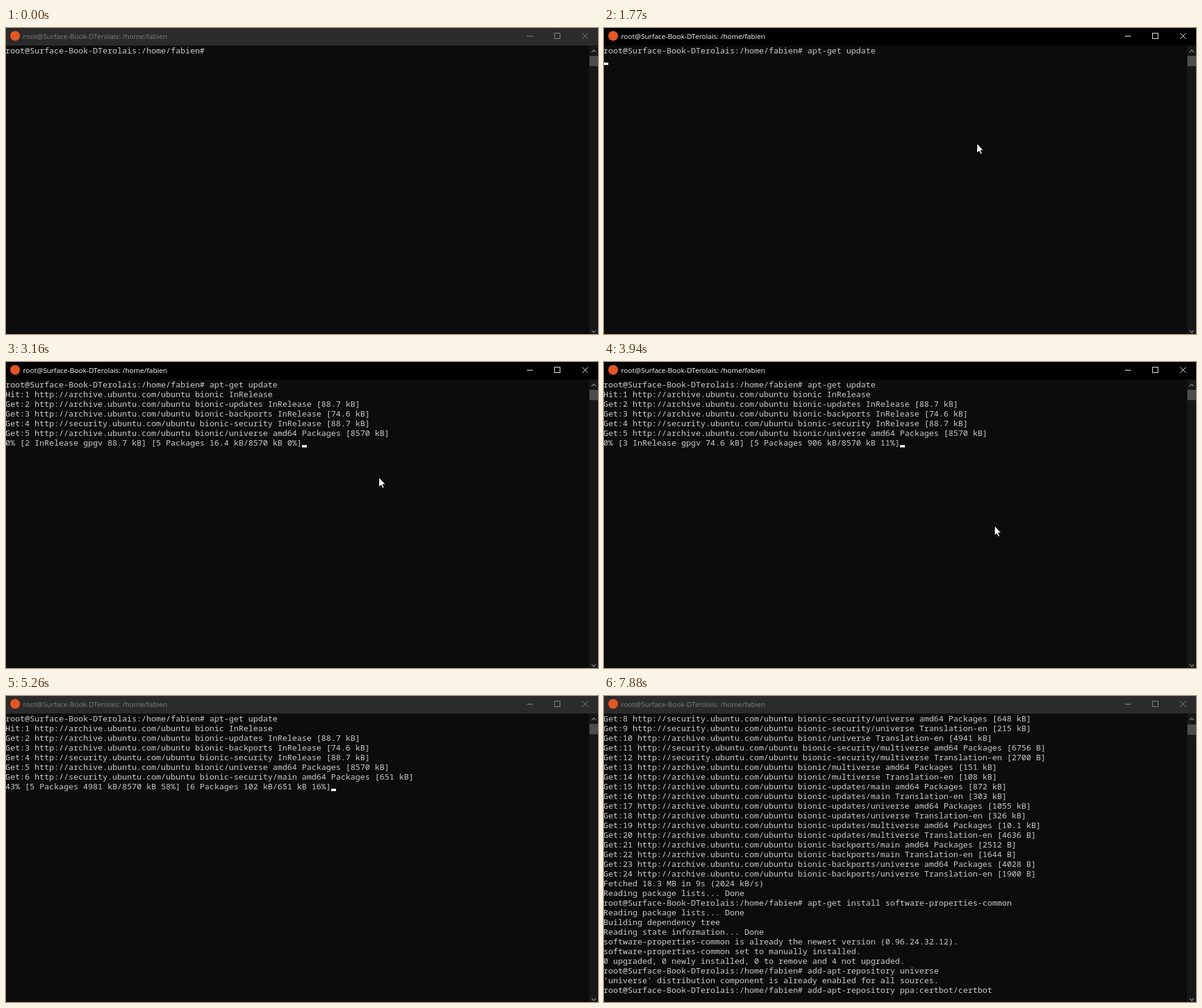
Write an HTML page that moves like this. It is 974x505 px and loops after 8000 ms.

```html
<!DOCTYPE html>
<html lang="en">
<head>
<meta charset="utf-8">
<title>Terminal</title>
<style>
html, body { margin: 0; width: 100%; height: 100%; overflow: hidden; background: #0c0c0c; }
svg { display: block; }
#title { font: 11.55px "Open Sans", "Noto Sans", sans-serif; }
#rows text { font: 13.3333px "Noto Sans Mono", "DejaVu Sans Mono", monospace; fill: #ccc; white-space: pre; }
</style>
</head>
<body>
<svg width="974" height="505" viewBox="0 0 974 505">
  <rect width="974" height="505" fill="#0c0c0c"/>
  <rect id="bar" width="974" height="29"/>
  <circle cx="15" cy="13" r="8" fill="#e95420"/>
  <text id="title" x="28" y="18"></text>
  <g id="buttons" fill="none">
    <path d="M857 13.5h10M902.5 8.5h9v9h-9z" shape-rendering="crispEdges"/>
    <path d="M948 8.5l9.5 9.5M957.5 8.5l-9.5 9.5"/>
  </g>
  <rect x="959" y="29" width="15" height="476" fill="#171717"/>
  <rect id="thumb" x="960" width="14" height="17" fill="#4d4d4d"/>
  <path d="M963.5 40l3.5-3.5 3.5 3.5M963.5 499l3.5 3.5 3.5-3.5" fill="none" stroke="#7c7c7c" stroke-width="1.6"/>
  <g id="rows"></g>
  <rect id="caret" width="8" height="4" fill="#f2f2f2"/>
  <path id="pointer" d="M.5 .5V16.5L4.2 13 6.7 18.4 9.2 17.3 6.8 12H11.5Z" fill="#fff" stroke="#000"/>
  <circle id="click" cx="629" cy="212" r="12" fill="#ff0" fill-opacity=".5"/>
</svg>
<script>
const LOOP = 8000, ROWS = 29;
const $ = id => document.getElementById(id);
const host = "root@Surface-Book-DTerolais:";
const prompt = host + "/home/fabien# ";

// number, server, suite, kind, size
const feed = `2 a -updates R 88.7 kB
3 a -backports R 74.6 kB
4 s -security R 88.7 kB
5 a /universe P 8570 kB
6 s -security/main P 651 kB
7 s -security/main T 211 kB
8 s -security/universe P 648 kB
9 s -security/universe T 215 kB
10 a /universe T 4941 kB
11 s -security/multiverse P 6756 B
12 s -security/multiverse T 2700 B
13 a /multiverse P 151 kB
14 a /multiverse T 108 kB
15 a -updates/main P 872 kB
16 a -updates/main T 303 kB
17 a -updates/universe P 1055 kB
18 a -updates/universe T 326 kB
19 a -updates/multiverse P 10.1 kB
20 a -updates/multiverse T 4636 B
21 a -backports/main P 2512 B
22 a -backports/main T 1644 B
23 a -backports/universe P 4028 B
24 a -backports/universe T 1900 B`;
const server = { a: "archive", s: "security" };
const kind = { R: "InRelease", P: "amd64 Packages", T: "Translation-en" };
const gets = feed.split("\n").map(line => {
  const [n, s, suite, k, size, unit] = line.split(" ");
  return `Get:${n} http://${server[s]}.ubuntu.com/ubuntu bionic${suite} ${kind[k]} [${size} ${unit}]`;
});
const log = [
  prompt + "apt-get update",
  "Hit:1 http://archive.ubuntu.com/ubuntu bionic InRelease",
  ...gets,
  "Fetched 18.3 MB in 9s (2024 kB/s)",
  "Reading package lists... Done",
  prompt + "apt-get install software-properties-common",
  "Reading package lists... Done",
  "Building dependency tree",
  "Reading state information... Done",
  "software-properties-common is already the newest version (0.96.24.32.12).",
  "software-properties-common set to manually installed.",
  "0 upgraded, 0 newly installed, 0 to remove and 4 not upgraded.",
  prompt + "add-apt-repository universe",
  "'universe' distribution component is already enabled for all sources.",
  prompt + "add-apt-repository ppa:certbot/certbot"
];

// start time, finished log lines, live last line
const gpgv1 = "0% [1 InRelease gpgv 242 kB]";
const gpgv3 = "0% [3 InRelease gpgv 74.6 kB] [5 Packages ";
const screens = [
  [0, 0, prompt],
  [1450, 0, log[0]],
  [1770, 1, ""],
  [2150, 1, "0% [Working]"],
  [2320, 1, "0% [Connecting to archive.ubuntu.com (2001:67c:1560:8001::14)] [Connecting to security.ubuntu.com (2001:67c:1562::19)]"],
  [2400, 4, gpgv1],
  [2470, 5, gpgv1 + " [4 InRelease 12.0 kB/88.7 kB 14%]"],
  [2700, 5, gpgv1],
  [3160, 6, "0% [2 InRelease gpgv 88.7 kB] [5 Packages 16.4 kB/8570 kB 0%]"],
  [3620, 6, gpgv3 + "94.2 kB/8570 kB 1%]"],
  [3790, 6, gpgv3 + "455 kB/8570 kB 5%]"],
  [3940, 6, gpgv3 + "906 kB/8570 kB 11%]"],
  [4090, 6, gpgv3 + "1352 kB/8570 kB 16%]"],
  [4240, 6, "0% [5 Packages 1876 kB/8570 kB 22%]"],
  [4550, 7, "28% [5 Packages 2884 kB/8570 kB 34%]"],
  [4630, 7, "30% [5 Packages 3146 kB/8570 kB 37%] [6 Packages 3887 B/651 kB 1%]"],
  [5180, 7, "43% [5 Packages 4981 kB/8570 kB 58%] [6 Packages 102 kB/651 kB 16%]"],
  [5410, 26, ""],
  [7880, log.length - 1, log[log.length - 1]]
];

// start time, tip position; no position hides the pointer
const moves = [
  [0], [70, 815, 425], [140, 790, 375], [220, 758, 319], [290, 737, 289],
  [440, 690, 252], [520, 646, 222], [590, 629, 212],
  [1530, 625, 206], [1610, 618, 196], [1690, 613, 190],
  [3790, 617, 209], [3870, 628, 239], [3940, 642, 270], [4020, 660, 312],
  [4090, 680, 358], [4170, 701, 412], [4240, 720, 466], [4320]
];

const lines = Array.from({ length: ROWS }, (_, i) => {
  const el = document.createElementNS("http://www.w3.org/2000/svg", "text");
  el.setAttribute("x", -1);
  el.setAttribute("y", 42 + 16 * i);
  return $("rows").appendChild(el);
});
$("title").textContent = host + " /home/fabien";

const at = (list, t) => list.filter(step => step[0] <= t).pop();
const show = (id, on) => $(id).setAttribute("visibility", on ? "visible" : "hidden");
const set = (id, attrs) => {
  for (const k in attrs) $(id).setAttribute(k, attrs[k]);
};

function draw(t) {
  const active = t >= 670 && t < 5260;
  set("bar", { fill: active ? "#000" : "#2b2b2b" });
  set("title", { fill: active ? "#fff" : "#808080" });
  set("buttons", { stroke: active ? "#fff" : "#8c8c8c" });

  const [, done, live] = at(screens, t);
  const text = [...log.slice(0, done), live].slice(-ROWS);
  lines.forEach((el, i) => {
    const s = text[i] || "";
    if (el.textContent !== s) el.textContent = s;
  });
  set("caret", { x: live.length * 8 - 1, y: 25 + 16 * text.length });
  show("caret", t >= 1220 && t < 7880);
  set("thumb", { y: t < 7880 ? 46 : 47 });

  const [, x, y] = at(moves, t);
  show("pointer", x !== undefined);
  if (x !== undefined) set("pointer", { transform: `translate(${x} ${y})` });
  show("click", t >= 670 && t < 840);
}

const start = performance.now();
function tick(now) {
  draw(Math.max(0, now - start) % LOOP);
  requestAnimationFrame(tick);
}
draw(0);
requestAnimationFrame(tick);
</script>
</body>
</html>
```
